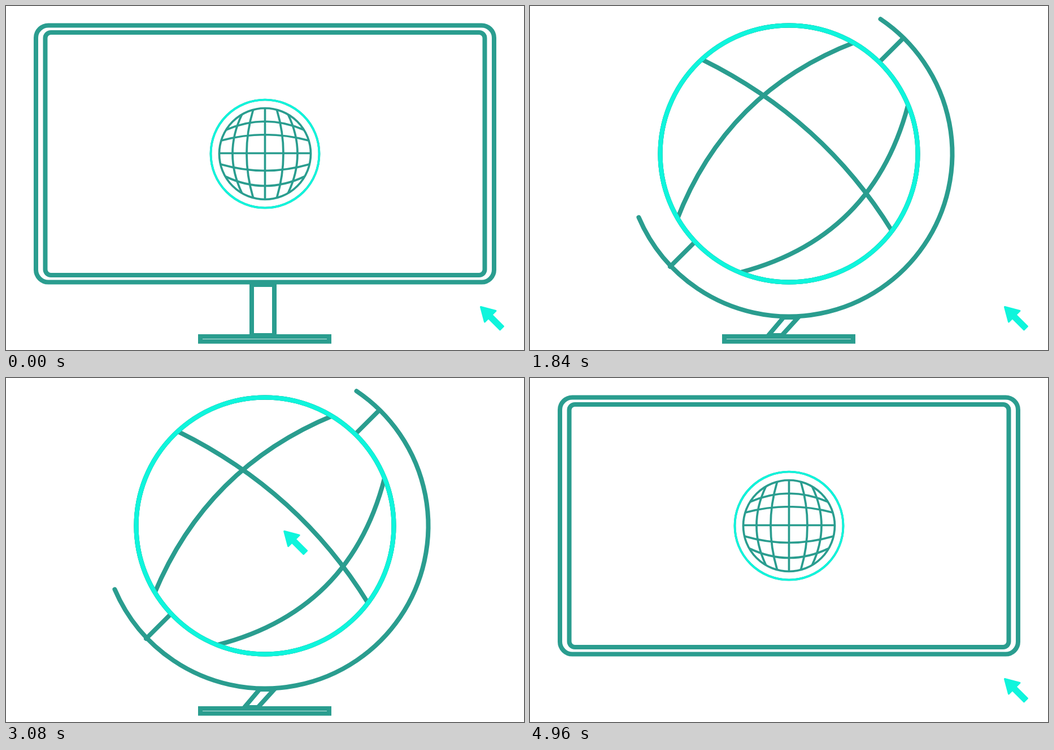
Write an HTML page with a canvas that moves like this. It is 917 by 611 pixels and loops after 5 s.

```html
<!DOCTYPE html>
<html lang="en">
<head>
<meta charset="utf-8">
<title>Monitor and globe</title>
<style>
html, body { margin: 0; width: 100%; height: 100%; overflow: hidden; background: #fff; }
canvas { display: block; }
</style>
</head>
<body>
<canvas id="stage" width="917" height="611"></canvas>
<script>
const ctx = document.getElementById('stage').getContext('2d');
const TEAL = '#2a9d8f', CYAN = '#0ff5dc';
const CX = 458.5, CY = 262.5, R = 228;
const RAD = Math.PI / 180;
const LOOP = 5000, STEP = 40;

const mix = (a, b, p) => a + (b - a) * p;
// Eased progress from frame a to frame b
function ease(n, a, b) {
  const p = Math.min(1, Math.max(0, (n - a) / (b - a)));
  return p * p * (3 - 2 * p);
}
// Rises over a..b, falls back over c..d
const pulse = (n, a, b, c, d) => ease(n, a, b) - ease(n, c, d);

function stroke(color, width, build) {
  ctx.strokeStyle = color;
  ctx.lineWidth = width;
  ctx.beginPath();
  build();
  ctx.stroke();
}
function poly(points) {
  points.forEach(([x, y]) => ctx.lineTo(x, y));
  ctx.closePath();
}
function curve(x0, y0, cx, cy, x1, y1) {
  ctx.moveTo(x0, y0);
  ctx.quadraticCurveTo(cx, cy, x1, y1);
}

// Two nested frames; at g = 1 both are the globe's circle
function drawMonitor(g) {
  for (const [w, h, r] of [[405.5, 228, 22], [389, 215.5, 10]]) {
    const hw = mix(w, R, g), hh = mix(h, R, g);
    stroke(TEAL, 8, () => ctx.roundRect(CX - hw, CY - hh, 2 * hw, 2 * hh, mix(r, R, g)));
  }
}

function drawStand(p) {
  const top = mix(495, 553, p);
  stroke(TEAL, 8, () => poly([
    [mix(435, 449, p), top], [475, top],
    [mix(475, 446, p), 585], [mix(435, 422, p), 585]
  ]));
  stroke(TEAL, 8, () => ctx.rect(344, 587, 228, 8.7));
}

function drawIcon(scale) {
  if (scale < 0.005) return;
  ctx.save();
  ctx.translate(CX, CY);
  ctx.scale(scale, scale);
  stroke(TEAL, 3.7, () => ctx.arc(0, 0, 96, 0, 7));
  stroke(TEAL, 3.7, () => ctx.arc(0, 0, 81, 0, 7));
  stroke(TEAL, 3.7, () => {
    curve(0, -81, 0, 0, 0, 81);
    curve(-81, -1, 0, -1, 81, -1);
    // [bulge, end offset, half length]
    for (const [m, e, l] of [[32.5, 21, 78], [57.5, 41, 69.5]])
      for (const s of [-1, 1])
        curve(s * e, -l, s * (2 * m - e), -0.5, s * e, l);
    for (const [m, e, l] of [[-34, -23.5, 77.5], [-57.5, -42.5, 69], [30, 18.5, 79], [57, 40.5, 69.5]])
      curve(-l, e, 0, 2 * m - e, l, e);
  });
  ctx.restore();
}

// Grid lines in tilted axes: x runs across the globe, -y towards its upper pole
function drawGrid(n, ring) {
  ctx.save();
  ctx.beginPath();
  ctx.arc(CX, CY, ring, 0, 7);
  ctx.clip();
  ctx.translate(CX, CY);
  ctx.rotate(45 * RAD);
  for (const start of [28, 36.45, 43.7, 51.9, 57.9, 66.2]) {
    if (n <= start || n >= start + 22) continue;
    const v = mix(-235, 235, ease(n, start, start + 22));
    stroke(TEAL, 8, () => curve(0.533 * v, -224, 1.467 * v, 0, 0.533 * v, 224));
  }
  const e = pulse(n, 28, 40.5, 76, 88);
  if (e > 0) {
    const u = mix(-230, 20.9, e);
    stroke(TEAL, 8, () => curve(-226, 11 - u, 0, -u - 65 * e, 226, -11 - u));
  }
  ctx.restore();
}

function drawMount(p) {
  if (p <= 0) return;
  ctx.lineCap = 'round';
  stroke(TEAL, 8, () => ctx.arc(CX, CY, 289, mix(88, -55.9, p) * RAD, mix(88, 157, p) * RAD));
  stroke(TEAL, 8, () => {
    ctx.moveTo(621, 97);
    ctx.lineTo(mix(621, 660, p), mix(97, 58, p));
    ctx.moveTo(290, 421);
    ctx.lineTo(mix(290, 248, p), mix(421, 463, p));
  });
  ctx.lineCap = 'butt';
}

function drawCursor(p) {
  ctx.save();
  ctx.translate(mix(839.5, 459.5, p), mix(533.5, 247, p));
  ctx.lineJoin = 'round';
  ctx.fillStyle = CYAN;
  stroke(CYAN, 3, () => poly([
    [1, 1], [27.5, 8], [20.5, 15], [41, 35.5], [35, 41.5], [14.5, 21], [8, 27.5]
  ]));
  ctx.fill();
  ctx.restore();
}

function draw(n) {
  ctx.fillStyle = '#fff';
  ctx.fillRect(0, 0, 917, 611);
  const globe = pulse(n, 14.5, 29.5, 78.5, 98);
  const ring = mix(96, R, globe);
  if (n < 120) drawStand(pulse(n, 14.5, 28, 85, 99));
  drawMount(pulse(n, 17, 29, 82, 89.5));
  drawMonitor(globe);
  drawIcon(1 - globe);
  drawGrid(n, ring);
  stroke(CYAN, mix(3.7, 8, globe), () => ctx.arc(CX, CY, ring, 0, 7));
  drawCursor(pulse(n, 0, 14, 17, 30.6) + pulse(n, 63, 76.4, 78, 91.8));
}

// Every 31 steps show 30 frames, so one frame in each cycle is held twice
function tick(now) {
  const step = Math.floor((now % LOOP) / STEP);
  draw(step - Math.floor((step + 30) / 31));
  requestAnimationFrame(tick);
}
draw(0);
requestAnimationFrame(tick);
</script>
</body>
</html>
```
